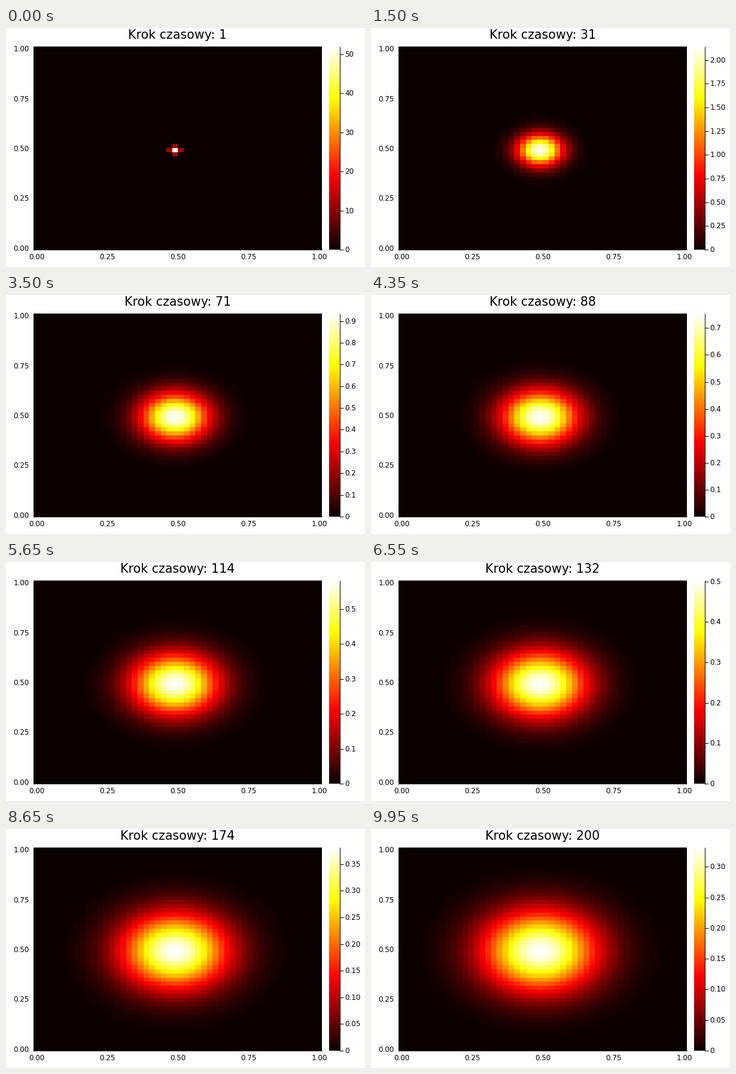
A matplotlib script for the animation above (10 s loop, 600x400 px).

```python
import math

import numpy as np
import matplotlib.pyplot as plt
from matplotlib.animation import FuncAnimation

W, H, DPI = 600, 400, 100
STEPS = 200
N = 50                                   # grid cells per side
R = 0.12                                 # diffusion number
LEFT, RIGHT, TOP, BOTTOM = 46, 528, 31, 371
BAR_L, BAR_R = 540, 558
PX = 72 / DPI                            # points per pixel

plt.rcParams["font.family"] = "DejaVu Sans"


def diffuse():
    """Temperature after every explicit step, with cold fixed edges."""
    u = np.zeros((N, N))
    u[24, 24] = 100
    states = []
    for _ in range(STEPS):
        lap = (u[2:, 1:-1] + u[:-2, 1:-1] + u[1:-1, 2:] + u[1:-1, :-2]
               - 4 * u[1:-1, 1:-1])
        u = u.copy()
        u[1:-1, 1:-1] += R * lap
        states.append(u)
    return states


def tick_step(top):
    """Colour bar tick distance for the range 0 to top."""
    power = math.floor(math.log10(top))
    factor = top / 10 ** power
    unit = 1 if factor > 5 else 0.5 if factor > 2.5 else 0.25
    return unit * 10.0 ** power


states = diffuse()
# Cell shown in each pixel column; cells start on the next whole pixel.
columns = np.arange(RIGHT - LEFT) * N // (RIGHT - LEFT)

fig = plt.figure(figsize=(W / DPI, H / DPI), dpi=DPI, facecolor="white")
ax = fig.add_axes([0, 0, 1, 1])
ax.axis("off")


def label(x, y, text, ha, size=12):
    return ax.text(x, y, text, ha=ha, va="baseline",
                   fontsize=size * PX, color="black")


def line(xs, ys):
    """One pixel wide line, snapped to the pixel right of or below xs, ys."""
    return ax.plot(xs, ys, color="black", lw=PX, solid_capstyle="butt")[0]


def image(data, left, right):
    return ax.imshow(data, cmap="hot", origin="lower", aspect="auto",
                     interpolation="nearest",
                     extent=(left, right, BOTTOM, TOP))


heat = image(states[0][:, columns], LEFT, RIGHT)
image(np.linspace(0, 1, 256)[:, None], BAR_L, BAR_R)

line([LEFT, LEFT], [TOP, BOTTOM + 1])
line([LEFT, RIGHT], [BOTTOM, BOTTOM])
line([BAR_R, BAR_R], [TOP, BOTTOM + 1])

# Axis values sit at cell centres, so 0 and 1 are half a cell inside.
cell_w, cell_h = (RIGHT - LEFT) / N, (BOTTOM - TOP) / N
for v in np.linspace(0, 1, 5):
    x = LEFT + cell_w * (0.5 + v * (N - 1))
    y = BOTTOM - cell_h * (0.5 + v * (N - 1))
    label(x + 0.4, 387, f"{v:.2f}", "center")
    label(38.8, y + 4.95, f"{v:.2f}", "right")

title = label((LEFT + RIGHT) / 2, 18, "", "center", 20.6)
ticks = [(line([BAR_R, 564], [BOTTOM] * 2), label(566.3, BOTTOM, "", "left"))
         for _ in range(12)]

ax.set_xlim(0, W)
ax.set_ylim(H, 0)


def update(i):
    u = states[i]
    top = u.max()
    heat.set_data(u[:, columns])
    heat.set_clim(0, top)
    title.set_text(f"Krok czasowy: {i + 1}")

    step = tick_step(top)
    decimals = len(f"{step:g}".partition(".")[2])
    for k, (mark, text) in enumerate(ticks):
        v = k * step
        shown = v <= top
        mark.set_visible(shown)
        text.set_visible(shown)
        if shown:
            y = BOTTOM - (BOTTOM - TOP) * v / top
            mark.set_ydata([y] * 2)
            text.set_y(y + 4)
            text.set_text(f"{v:.{decimals}f}" if k else "0")
    return []


anim = FuncAnimation(fig, update, frames=STEPS, interval=50, repeat=True,
                     repeat_delay=0, init_func=lambda: update(0))
plt.show()
```
